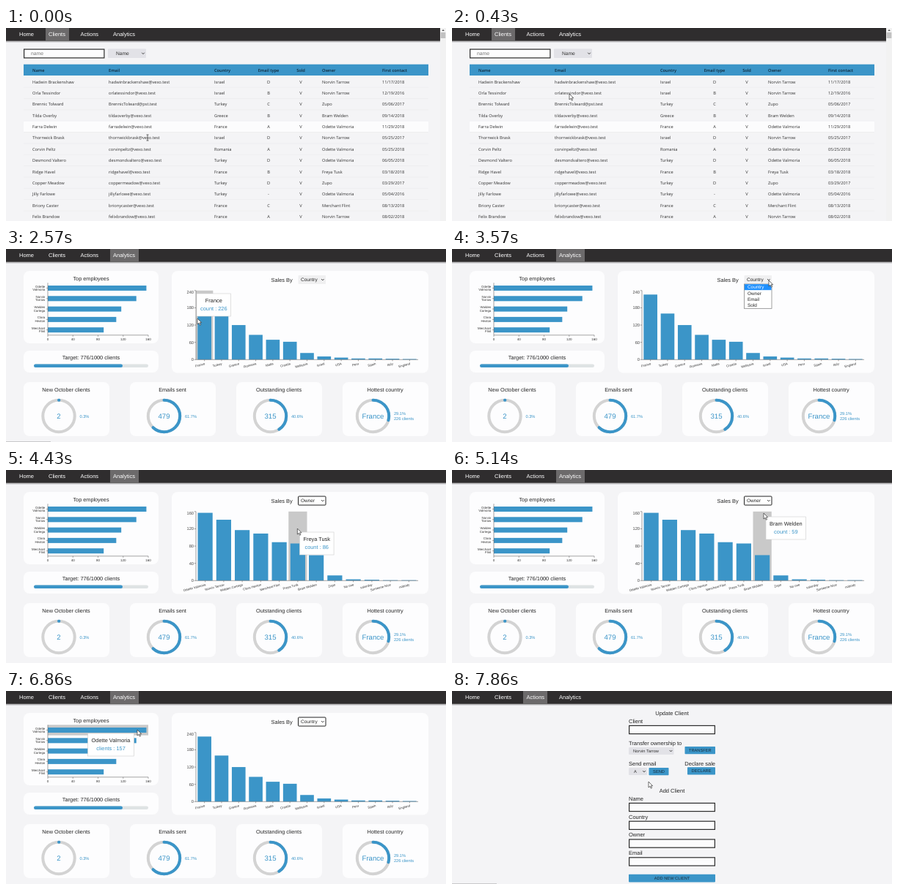
An HTML page that plays this animation: 600 px wide and 264 px high, repeating every 8000 ms.

```html
<!DOCTYPE html>
<html lang="en">
<head>
<meta charset="utf-8">
<title>Client manager</title>
<style>
html, body { margin: 0; width: 600px; height: 264px; overflow: hidden; background: #f4f4f6; }
svg { display: block; }
text { font-family: "Liberation Sans", Arial, sans-serif; text-rendering: geometricPrecision; white-space: pre; }
.table text { font-family: "Open Sans", "Noto Sans", sans-serif; }
</style>
</head>
<body>
<svg id="stage" width="600" height="264" viewBox="0 0 600 264"></svg>
<script>
const stage = document.getElementById("stage");
const LOOP = 8000, STEP = 1000 / 7;
const BLUE = "#3b95c8", INK = "#262626", GREY = "#c9c9c9";

const OWNERS = ["Odette Valmoria", "Norvin Tarrow", "Walden Cortega", "Clara Hexton", "Merchant Flint",
  "Freya Tusk", "Bram Welden", "Zupo"];
const [ODETTE, NORVIN, , , MERCHANT, FREYA, BRAM, ZUPO] = OWNERS;

const CLIENTS = [
  ["Hadwin Brackenshaw", "Israel", "D", NORVIN, "11/17/2018"],
  ["Orla Tessindor", "Israel", "B", NORVIN, "12/19/2016"],
  ["Brennic Tolward", "Turkey", "C", ZUPO, "05/06/2017"],
  ["Tilda Overby", "Greece", "B", BRAM, "09/14/2018"],
  ["Farra Delwin", "France", "A", ODETTE, "11/29/2018"],
  ["Thornwick Brask", "Israel", "D", NORVIN, "05/25/2017"],
  ["Corvin Peltz", "Romania", "A", ODETTE, "05/25/2018"],
  ["Desmond Valtero", "Turkey", "D", ODETTE, "06/05/2018"],
  ["Ridge Havel", "France", "B", FREYA, "03/18/2018"],
  ["Copper Meadow", "Turkey", "D", ZUPO, "03/29/2017"],
  ["Jilly Farlowe", "Turkey", "-", ODETTE, "05/04/2016"],
  ["Briony Caster", "France", "C", MERCHANT, "08/13/2018"],
  ["Felix Brandow", "France", "A", NORVIN, "08/02/2018"]
];

const SALES = {
  Country: {
    max: 240,
    names: "France Turkey Greece Romania Malta Croatia Malaysia Israel USA Peru Spain Italy England".split(" "),
    counts: [226, 160, 120, 86, 69, 62, 23, 11, 7, 4, 4, 3, 2]
  },
  Owner: {
    max: 160,
    names: [...OWNERS, "No one", "saturday", "Someone Nice", "nobody"],
    counts: [157, 141, 117, 109, 89, 86, 59, 12, 3, 2, 1, 1]
  }
};

const NAV = [["Home", 18, 14, 28], ["Clients", 58, 54, 32], ["Actions", 101.5, 97, 33], ["Analytics", 146, 142, 39]];

// Pointer path: step, x, y
const PATH = [
  [0, 193, 150], [3, 160, 90], [5, 114, 14], [8, 114, 14], [9, 190, 70], [10, 262, 130], [11, 220, 80],
  [12, 160, 11], [15, 160, 11], [18, 261, 95], [20, 300, 98], [22, 390, 70], [23, 432, 43], [25, 432, 43],
  [27, 412, 60], [29, 412, 60], [32, 390, 90], [36, 425, 59], [38, 424, 60], [40, 432, 43], [42, 412, 52],
  [43, 412, 52], [46, 215, 60], [47, 186, 54], [48, 179, 53], [49, 165, 54], [51, 130, 70], [53, 114, 13],
  [54, 114, 13], [55, 268, 124]
];

const text = (s, x, y, size = 7.5, fill = INK, extra = "") =>
  `<text x="${x}" y="${y}" font-size="${size}" fill="${fill}" ${extra}>${s}</text>`;
const MID = 'text-anchor="middle"', END = 'text-anchor="end"';
const rect = (x, y, w, h, fill, extra = "") =>
  `<rect x="${x}" y="${y}" width="${w}" height="${h}" fill="${fill}" ${extra}/>`;
const line = (d, stroke = "#666", width = 0.6) =>
  `<path d="${d}" fill="none" stroke="${stroke}" stroke-width="${width}"/>`;
const chevron = (x, y) => line(`M${x - 1.8} ${y - 1}l1.8 1.9l1.8 -1.9`, "#333", 0.9);
const input = (x, y, w, h) =>
  rect(x + 0.6, y + 0.6, w - 1.2, h - 1.2, "#fcfcfd", 'stroke="#2c2c2c" stroke-width="1.2"');
const button = (label, x, y, w, h = 10.3) =>
  rect(x, y, w, h, BLUE, 'rx=".8"') + text(label, x + w / 2, y + h / 2 + 2, 5.7, "#1a2c3a", MID);
const select = (label, x, y, w, h, dx, size) =>
  rect(x, y, w, h, "#e2e2e7", 'rx="1"') + text(label, x + dx, y + h / 2 + size * 0.36, size, "#333") +
  chevron(x + w - 4, y + h / 2);

function pointerAt(k) {
  const i = Math.max(1, PATH.findIndex(p => p[0] >= k));
  const [k0, x0, y0] = PATH[i - 1], [k1, x1, y1] = PATH[i];
  const f = (k - k0) / (k1 - k0);
  return { x: x0 + (x1 - x0) * f, y: y0 + (y1 - y0) * f };
}

function navBar(page, p) {
  const items = NAV.map(([label, x, left, w]) => {
    const hover = p.y < 18 && p.x >= left && p.x <= left + w;
    const fill = label !== page ? (hover ? "#5a5859" : "none") : hover && page === "Actions" ? "#9b999a" : "#6c6a6b";
    const ink = fill === "#9b999a" ? "#1c1c1c" : "#fff";
    return rect(left, 0, w, 17.6, fill) + text(label, x, 11, 7.5, ink);
  });
  return rect(0, 17, 600, 3, "#d9d9dc") + rect(0, 17, 600, 1.6, "#a9a8aa") + rect(0, 0, 600, 17.6, "#2f2d2e") + items.join("");
}

function clientsPage() {
  const cols = [36, 140, 284, 358, 402, 431, 513];
  const centred = i => i === 3 || i === 4 ? MID : "";
  const row = (cells, y, extra = "") =>
    cells.map((c, i) => text(c, cols[i], y, 5.7, extra ? "#10283a" : "#333", centred(i) + extra)).join("");
  const rows = CLIENTS.map(([name, country, type, owner, date], i) => {
    const y = 73.6 + i * 15.35;
    const joined = name.replace(" ", "");
    const mail = i === 2 ? joined + "@pst.test" : joined.toLowerCase() + "@vexo.test";
    return (i === 4 ? rect(24, y - 7.4, 552, 14.4, "#fcfcfd") : "") +
      line(`M24 ${y + 7.6}H576`, "#e6e6e9", 0.5) + row([name, mail, country, type, "V", owner, date], y + 2.1);
  });
  const headings = ["Name", "Email", "Country", "Email type", "Sold", "Owner", "First contact"];
  return input(24, 28.5, 110.5, 13) + text("name", 34, 37.4, 6.8, "#777") +
    select("Name", 139, 28.5, 52, 12.5, 11, 6.7) +
    `<g class="table">${rect(24, 49.7, 552, 15.3, BLUE)}${row(headings, 59.6, ' font-weight="600"')}${rows.join("")}</g>`;
}

const scrollbar = () => rect(592, 0, 8, 264, "#f2f2f2") + rect(592.7, 6, 6.6, 8, "#c1c1c1") +
  '<path d="M594.3 4l1.8 -2l1.8 2z" fill="#555"/>';

function actionsPage() {
  const fields = ["Name", "Country", "Owner", "Email"].map((label, i) =>
    text(label, 241, 149.8 + i * 24.8) + input(241, 152.8 + i * 24.8, 118, 12.4));
  return text("Update Client", 300, 33, 7.5, INK, MID) +
    text("Client", 241, 43.6) + input(241, 46.8, 118, 12.4) +
    text("Transfer ownership to", 241, 73.5) + select(NORVIN, 241, 77, 61.5, 10, 6, 5.7) +
    button("TRANSFER", 317.5, 76, 41.5) +
    text("Send email", 241, 101.5) + select("A", 241, 105, 25, 10, 7, 5.7) +
    button("SEND", 268.5, 105, 27) +
    text("Declare sale", 359, 101.5, 7.5, INK, END) + button("DECLARE", 321, 104.3, 38) +
    text("Add Client", 300, 139, 7.5, INK, MID) + fields.join("") +
    button("ADD NEW CLIENT", 241, 250.8, 118, 10.6);
}

const card = (x, y, w, h) => rect(x, y, w, h, "#fdfdfe", 'rx="8"');

function employees(grow, hovered) {
  const scale = 137 / 160, band = 14.3;
  const bars = OWNERS.slice(0, 5).map((name, i) => {
    const y = 46.3 + i * band, [first, last] = name.split(" ");
    return (i === hovered ? rect(57, y, 137, band, GREY) : "") +
      rect(57, y + 3.7, SALES.Owner.counts[i] * scale * grow, 7, BLUE) +
      line(`M55 ${y + band / 2}h2`) +
      text(first, 53.3, y + 6.2, 4.4, "#333", END) + text(last, 53.3, y + 10.8, 4.4, "#333", END);
  });
  const ticks = [0, 40, 80, 120, 160].map(v => {
    const x = 57 + v * scale;
    return line(`M${x} 117.8v2`) + text(v, x, 124.6, 4.5, "#333", MID);
  });
  return card(24, 30, 184, 99) + text("Top employees", 116, 42.6, 7.3, INK, MID) + bars.join("") +
    line("M57 46.3V117.8H194") + ticks.join("");
}

function salesChart(data, grow, hovered) {
  const left = 259, base = 151.3, high = 94.5, band = 303 / data.names.length;
  const bars = data.names.map((name, i) => {
    const x = left + i * band, h = data.counts[i] / data.max * high * grow, mid = x + band / 2;
    return (i === hovered ? rect(x, base - high, band, high, GREY) : "") +
      rect(x + band * 0.1, base - h, band * 0.8, h, BLUE) + line(`M${mid} ${base}v2`) +
      text(name, mid + 1, 158.2, 4.4, "#333", `${END} transform="rotate(-15 ${mid + 1} 158.2)"`);
  });
  const ticks = [0, 1, 2, 3, 4].map(i => {
    const y = base - i * high / 4;
    return line(`M${left - 2.3} ${y}h2.3`) +
      text(data.max * i / 4, 256, y + (i === 4 ? 4 : 2), 5.7, "#444", END);
  });
  return bars.join("") + line(`M${left} ${base - high}V${base}H562`) + ticks.join("");
}

function picker(choice, open, focused, marked) {
  const border = focused ? 'stroke="#222" stroke-width="1"' : "";
  let out = text("Sales By", 361.5, 44.6, 7.4) + rect(398.5, 36, 37.5, 12, focused ? "#fff" : "#f0f0f1", `rx="1" ${border}`) +
    text(choice, 402, 44.4, 6.5) + chevron(431.8, 42);
  if (open) {
    out += rect(398.5, 48, 37.5, 33.3, "#fff", 'stroke="#777" stroke-width=".7"') +
      ["Country", "Owner", "Email", "Sold"].map((label, i) =>
        rect(398.9, 48.2 + i * 8.1, 36.7, 8, i === marked ? "#1e90ff" : "none") +
        text(label, 403, 54.4 + i * 8.1, 6.4, i === marked ? "#fff" : INK)).join("");
  }
  return out;
}

function ring(i, title, label, share, notes, grow) {
  const x = 24 + i * 145, cx = [72, 215.5, 360.5, 500.5][i], r = 21.7, around = 2 * Math.PI * r;
  const circle = (stroke, extra = "") =>
    `<circle cx="${cx}" cy="228.5" r="${r}" fill="none" stroke="${stroke}" stroke-width="4" ${extra}/>`;
  const noteX = cx + 28.4, top = notes.length > 1 ? 227.4 : 230.6;
  return card(x, 182, 117, 74) + text(title, x + 58, 194.6, 7.3, INK, MID) + circle("#d3d3d3") +
    circle(BLUE, `stroke-linecap="round" stroke-dasharray="${share * grow * around} ${around}" transform="rotate(-90 ${cx} 228.5)"`) +
    text(label, cx, 231.6, 9.6, BLUE, MID) +
    notes.map((n, j) => text(n, noteX, top + j * 6.5, 5.7, BLUE)).join("");
}

const measure = document.createElement("canvas").getContext("2d");
function tooltip(title, note, p, at, limit) {
  measure.font = '74px "Liberation Sans", Arial, sans-serif';
  const w = Math.max(measure.measureText(title).width, measure.measureText(note).width) / 10 + 10;
  let [x, y] = at || [p.x + 3, p.y + 5];
  if (x + w > limit) x = p.x - w - 4.5;
  return rect(x, y, w, 31, "#fff", 'stroke="#ccc" stroke-width=".6"') +
    text(title, x + w / 2, y + 12, 7.4, INK, MID) + text(note, x + w / 2, y + 23, 7.4, BLUE, MID);
}

const growth = steps => 1 - (1 - Math.min(1, Math.max(0, steps / 3))) ** 2;

function analyticsPage(k, p) {
  const choice = k >= 29 && k < 43 ? "Owner" : "Country";
  const open = (k >= 24 && k < 29) || (k >= 40 && k < 43);
  const data = SALES[choice];
  const pageGrow = growth(k - 14), chartGrow = growth(k - (k >= 43 ? 42 : k >= 29 ? 28 : 14));
  const inside = (x, y, w, h) => !open && p.x >= x && p.x < x + w && p.y >= y && p.y < y + h;
  const col = inside(259, 56.8, 303, 94.5) ? Math.floor((p.x - 259) / 303 * data.names.length) : -1;
  const emp = inside(57, 46.3, 137, 71.5) ? Math.floor((p.y - 46.3) / 14.3) : -1;
  const marked = k < 27 ? (k < 26 ? 0 : 1) : k < 40 ? 1 : p.y > 50 ? 0 : 1;

  let out = employees(pageGrow, emp) +
    card(24, 139, 184, 30) + text("Target: 776/1000 clients", 116, 151.2, 7.4, INK, MID) +
    rect(38, 157.6, 156, 4.4, "#dfe3e4", 'rx="2.2"') + rect(38, 157.6, 121, 4.4, BLUE, 'rx="2.2"') +
    card(226, 30, 350, 139.5) + salesChart(data, chartGrow, col) + picker(choice, open, k >= 29, marked) +
    ring(0, "New October clients", "2", 0.003, ["0.3%"], pageGrow) +
    ring(1, "Emails sent", "479", 0.617, ["61.7%"], pageGrow) +
    ring(2, "Outstanding clients", "315", 0.406, ["40.6%"], pageGrow) +
    ring(3, "Hottest country", "France", 0.291, ["29.1%", "226 clients"], pageGrow);
  if (col >= 0) out += tooltip(data.names[col], "count : " + data.counts[col], p, k === 18 && [260, 61], 562);
  if (emp >= 0) out += tooltip(OWNERS[emp], "clients : " + SALES.Owner.counts[emp], p, null, 194);
  return out;
}

function pointer(k, p) {
  const shape = d => `<path d="${d}" fill="#fff" stroke="#333" stroke-width=".7" stroke-linejoin="round"/>`;
  let body;
  if (k === 0) body = line("M-1.5 -4h3M0 -4V4M-1.5 4h3", "#444", 0.8);
  else if (p.y < 18 && p.x < 181) {
    body = shape("M0 .6q.9 -.9 1.7 0V4l3.6 .9q.9 .3 .8 1.2L5.5 9.8H.8L-2 6.2q.4 -1.1 2 .1z");
  } else body = shape("M0 0V8l1.9 -1.7l1.4 2.9l1.3 -.6l-1.4 -2.8h2.5z");
  return `<g transform="translate(${p.x} ${p.y})">${body}</g>`;
}

function draw(k) {
  const p = pointerAt(k);
  const page = k < 6 ? "Clients" : k < 15 || k >= 53 ? "Actions" : "Analytics";
  const content = page === "Clients" ? clientsPage() : page === "Actions" ? actionsPage() : analyticsPage(k, p);
  const status = (k >= 5 && k < 20) || k >= 52;
  stage.innerHTML = rect(0, 0, 600, 264, "#f4f4f6") + content + navBar(page, p) +
    (page === "Clients" ? scrollbar() : "") +
    (status ? rect(0, 263, 61, 1, "#c8c8ca") : "") + pointer(k, p);
}

let shown = -1;
function tick() {
  const k = Math.floor((performance.now() % LOOP + 5) / STEP) % 56;
  if (k !== shown) draw(shown = k);
  requestAnimationFrame(tick);
}
tick();
</script>
</body>
</html>
```
